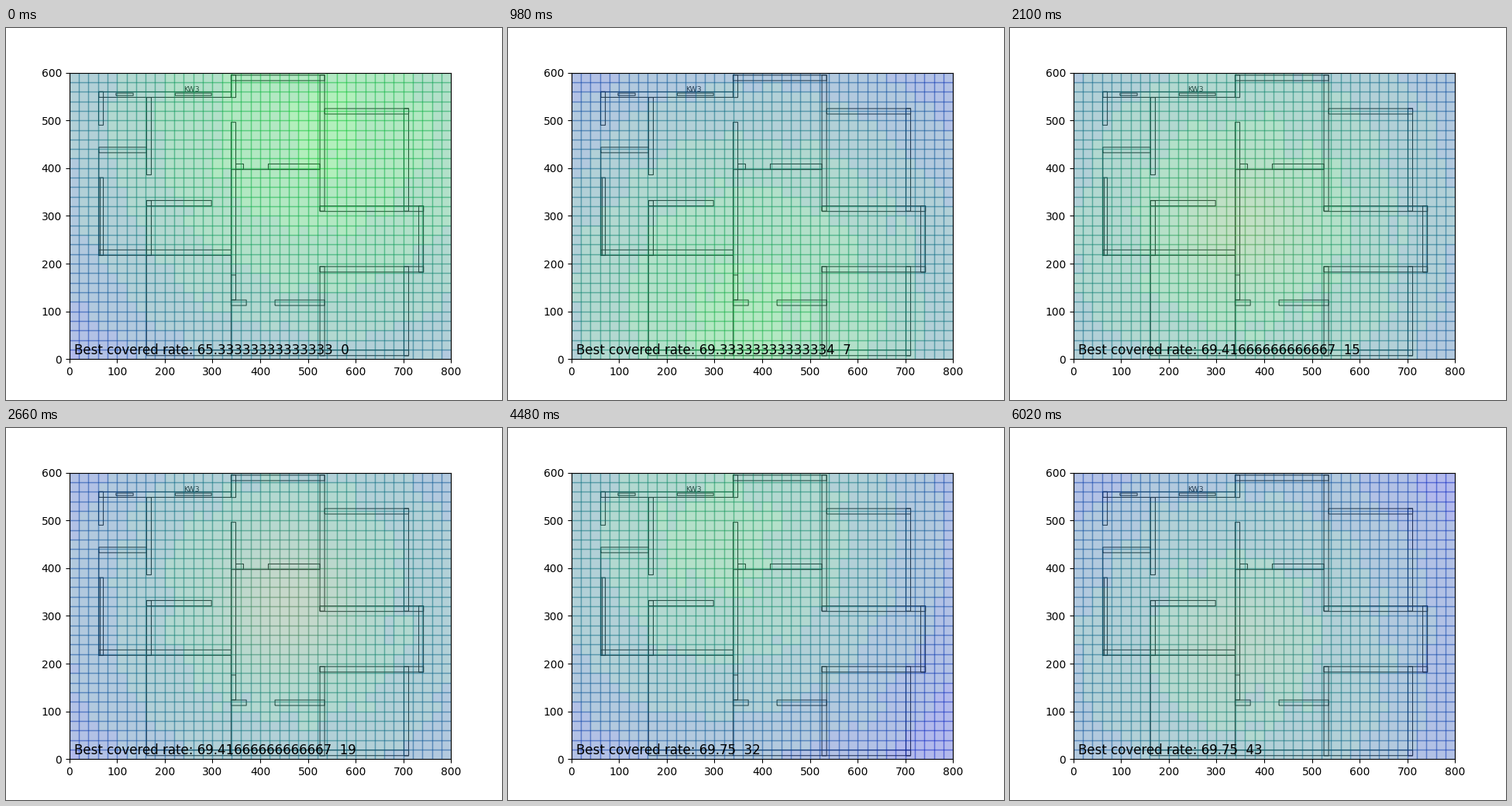
Recreate the animation shown at these times as a matplotlib script. Size 640 px wide and 480 px high, loop 6160 ms.

```python
import numpy as np
import matplotlib.pyplot as plt
from matplotlib.animation import FuncAnimation
from matplotlib.collections import LineCollection, PolyCollection

FRAMES, INTERVAL = 44, 140
W, H, CELL = 800, 600, 20
ALPHA, FALLOFF, SPREAD = 0.3, 0.38, 95
INK = "#333333"

# signal settings over time: frame, centre x, y, peak, warmth
KEYS = np.array([
    (0, 530, 490, 0.77, 0.00),
    (7, 370, 100, 0.70, 0.03),
    (12, 280, 230, 0.73, 0.18),
    (19, 460, 330, 0.60, 0.28),
    (25, 420, 240, 0.58, 0.12),
    (32, 310, 460, 0.60, 0.04),
    (43, 340, 240, 0.55, 0.15),
])

# first frame of each best result: covered cells
BEST = {0: 784, 2: 811, 5: 832, 9: 833, 22: 834, 28: 837}

# wall centrelines: y with spans of x, then x with spans of y
ACROSS = {
    589: [(339, 535)], 554: [(62, 339)], 519: [(535, 711)],
    438: [(62, 162)], 403: [(349, 365), (417, 525)], 326.5: [(162, 298)],
    315: [(525, 742)], 223: [(62, 339)], 188: [(525, 742)],
    118: [(339, 371), (431, 535)], 13: [(162, 711)],
}
UPRIGHT = {
    66.5: [(490, 560), (217, 380)], 167: [(386, 548), (217, 332)],
    344: [(548, 595), (124, 496)], 530: [(310, 595), (7, 194)],
    706: [(310, 525), (7, 194)], 737: [(182, 321)],
}


def box(x0, y0, x1, y1):
    return [(x0, y0), (x1, y0), (x1, y1), (x0, y1), (x0, y0)]


def plan():
    """Walls as thin boxes, two windows and the single lines."""
    lines = [box(a, y - 5.7, b, y + 5.7)
             for y, spans in ACROSS.items() for a, b in spans]
    lines += [box(x - 4.9, a, x + 4.9, b)
              for x, spans in UPRIGHT.items() for a, b in spans]
    lines += [box(a, 552, b, 557) for a, b in [(98, 134), (222, 298)]]
    lines += [[(x, 7), (x, 217)] for x in (162, 339)]
    lines += [[(62, 217), (62, 438)], [(65, 217), (65, 380)]]
    lines += [[(339, 397), (525, 397)], [(339, 176), (349, 176)]]
    return lines


rng = np.random.default_rng(4)
drift = rng.normal(0, 30, (FRAMES, 2))
gx, gy = np.meshgrid(np.arange(0, W, CELL), np.arange(0, H, CELL))
gx, gy = gx.ravel(), gy.ravel()
px, py = gx + CELL / 2, gy + CELL / 2

# coarse blocks make the contours slightly ragged
coarse = rng.normal(0, 0.01, (H // 60, W // 40))
rough = np.kron(coarse, np.ones((3, 2))).ravel()


def signal(i):
    """Green and red strength per cell, wandering a little between keys."""
    cx, cy, peak, warmth = (np.interp(i, KEYS[:, 0], c) for c in KEYS.T[1:])
    gap = np.abs(KEYS[:, 0] - i).min()
    dx, dy = min(gap / 3, 1) * drift[i]
    dist = np.hypot(px - cx - dx, py - cy - dy)
    red = warmth * np.exp(-dist ** 2 / (2 * SPREAD ** 2))
    green = peak - FALLOFF * (dist / 500) ** 1.4 - 0.4 * red + rough
    return np.clip(green, 0.1, 1), red


def rgba(green, red):
    blue = np.clip(0.85 - 0.9 * green - 0.3 * red, 0, 1)
    return np.column_stack([red, green, blue, np.full(green.size, ALPHA)])


fig, ax = plt.subplots(figsize=(6.4, 4.8), dpi=100)
ax.set_xlim(0, W)
ax.set_ylim(0, H)
ax.set_aspect("equal")

walls = LineCollection(plan(), colors=INK, linewidths=0.75, zorder=0.5)
walls.set_snap(False)
ax.add_collection(walls, autolim=False)
ax.text(256, 561, "KW3", fontsize=6.7, ha="center", color=INK, zorder=0.6)

corners = [(0, 0), (CELL, 0), (CELL, CELL), (0, CELL)]
squares = np.stack([np.column_stack([gx + a, gy + b]) for a, b in corners], axis=1)
cells = PolyCollection(squares, linewidths=1, zorder=1)
ax.add_collection(cells, autolim=False)
label = ax.text(10, 10, "", fontsize=12)


def update(i):
    green, red = signal(i)
    cells.set_facecolor(rgba(np.round(green, 1), red))
    cells.set_edgecolor(rgba(green, red))
    covered = max(n for start, n in BEST.items() if start <= i)
    label.set_text(f"Best covered rate: {covered / gx.size * 100}  {i}")
    return cells, label


anim = FuncAnimation(fig, update, frames=FRAMES, interval=INTERVAL,
                     repeat=True, repeat_delay=0, blit=False)
plt.show()
```
